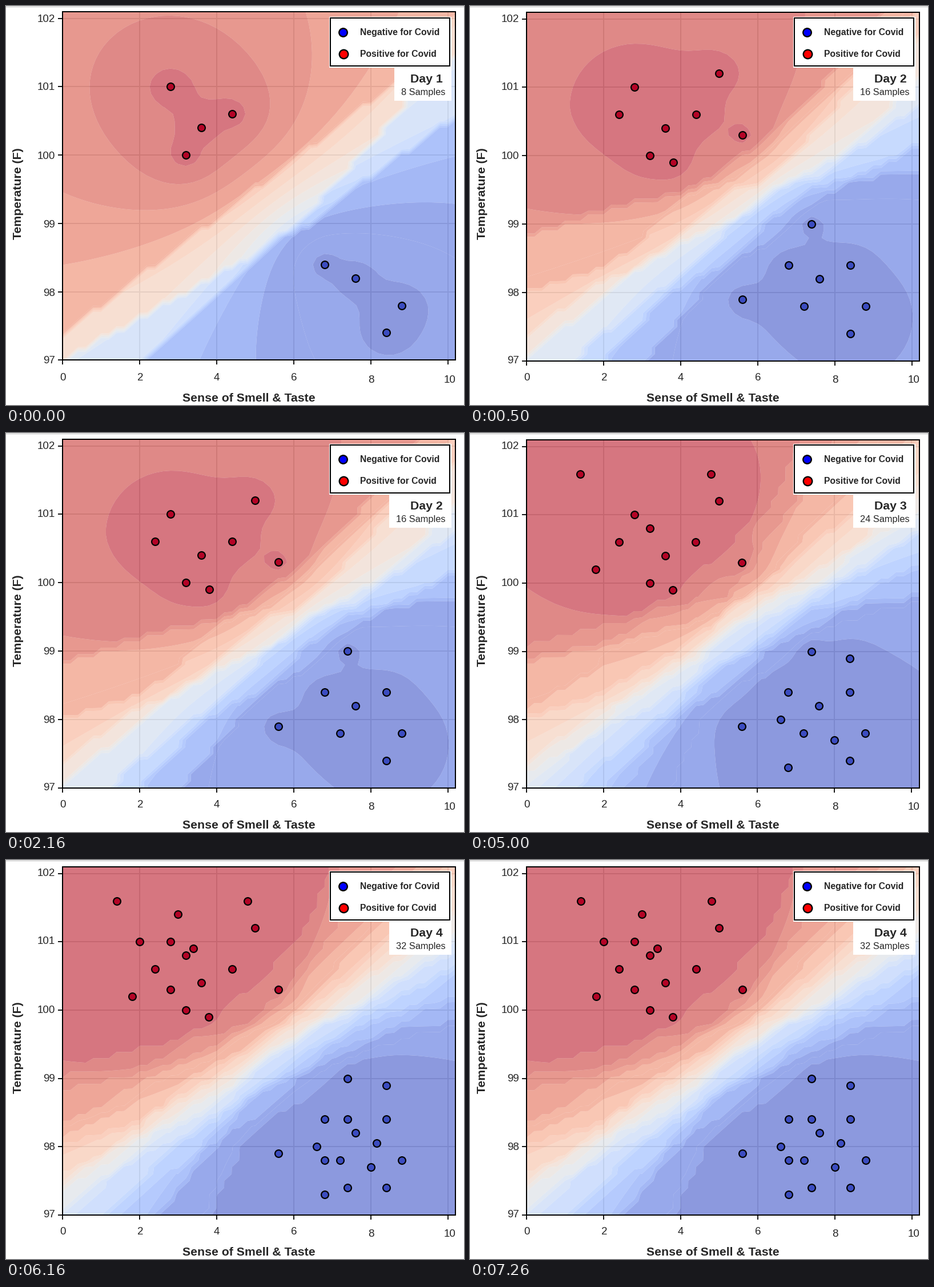
Write a matplotlib script that moves like this. It is 802x699 px and loops after 8000 ms.

```python
import numpy as np
import matplotlib.pyplot as plt
from matplotlib.animation import FuncAnimation
from matplotlib.patches import Rectangle

W, H, DPI = 802, 699, 100
PT = 72 / DPI                       # points per pixel
INTERVAL, FRAMES = 20, 400
STARTS = (0, 500, 3260, 6160)       # ms at which each day appears
X_MAX, Y_MIN, Y_MAX = 10.2, 97, 102.1
INK = "#262626"

# Samples added each day: (smell & taste, temperature)
POSITIVE = [
    [(2.8, 101), (4.4, 100.6), (3.6, 100.4), (3.2, 100)],
    [(5, 101.2), (2.4, 100.6), (5.6, 100.3), (3.8, 99.9)],
    [(1.4, 101.6), (4.8, 101.6), (3.2, 100.8), (1.8, 100.2)],
    [(3, 101.4), (2, 101), (3.4, 100.9), (2.8, 100.3)],
]
NEGATIVE = [
    [(6.8, 98.4), (7.6, 98.2), (8.8, 97.8), (8.4, 97.4)],
    [(7.4, 99), (8.4, 98.4), (5.6, 97.9), (7.2, 97.8)],
    [(8.4, 98.9), (6.6, 98), (8, 97.7), (6.8, 97.3)],
    [(7.4, 98.4), (8.15, 98.05), (6.8, 97.8), (7.4, 97.4)],
]
# Plot box of each day in pixels: left, top, right, bottom
BOXES = [
    (99.0, 9.8, 787.0, 620.3),
    (99.3, 10.6, 787.0, 622.0),
    (98.8, 11.7, 786.6, 621.9),
    (99.2, 11.7, 787.0, 621.9),
]

GX, GY = np.meshgrid(np.linspace(0, X_MAX, 52), np.linspace(Y_MIN, Y_MAX, 52))
LEVELS = np.linspace(0, 1, 25)


def band_colors():
    colors = plt.cm.coolwarm((LEVELS[:-1] + LEVELS[1:]) / 2)[:, :3]
    for a, b in ((1, 2), (18, 19)):  # neighbouring bands that share a shade
        colors[a] = colors[b] = (colors[a] + colors[b]) / 2
    return list(colors)


def probability(pos, neg):
    """Distance-weighted nearest-neighbour chance of a positive result."""
    pts = np.array(pos + neg)
    k = len(pts) // 2 + 1
    dist = np.hypot(GX[..., None] - pts[:, 0],
                    2 * (GY[..., None] - pts[:, 1])).round(9)
    near = np.argsort(dist, axis=-1, kind="stable")[..., :k]
    weight = 1 / np.maximum(np.take_along_axis(dist, near, -1), 1e-9)
    return (weight * (near < len(pos))).sum(-1) / weight.sum(-1)


def add_dots(ax, pts, color, diameter, width):
    x, y = zip(*pts)
    ax.scatter(x, y, s=(diameter * PT) ** 2, color=color, edgecolor="black",
               linewidth=width * PT, zorder=3)


def add_day(day):
    left, top, right, bottom = BOXES[day]
    ax = fig.add_axes([left / W, 1 - bottom / H,
                       (right - left) / W, (bottom - top) / H])
    pos, neg = sum(POSITIVE[:day + 1], []), sum(NEGATIVE[:day + 1], [])
    ax.contourf(GX, GY, probability(pos, neg), levels=LEVELS,
                colors=COLORS, alpha=0.6, antialiased=True)
    add_dots(ax, pos, plt.cm.coolwarm(1.0), 12.8, 2.2)
    add_dots(ax, neg, plt.cm.coolwarm(0.0), 12.8, 2.2)
    ax.set(xlim=(0, X_MAX), ylim=(Y_MIN, Y_MAX),
           xticks=range(0, 11, 2), yticks=range(97, 103))
    ax.tick_params(length=8 * PT, width=1.8 * PT, labelbottom=False,
                   labelleft=False)
    ax.set_axisbelow(True)
    ax.grid(color="#d6d6d6", linewidth=2 * PT)
    for spine in ax.spines.values():
        spine.set_linewidth(2 * PT)
    ax.set_visible(False)
    return ax


def label(x, y, text, size, ha="left", weight="normal"):
    """Text whose capitals are centred on pixel row y."""
    return stage.text(x, y + 0.36 * size, text, fontsize=size * PT, ha=ha,
                      va="baseline", weight=weight, color=INK, zorder=4)


def box(x0, y0, x1, y1, edge="none"):
    patch = Rectangle((x0, y0), x1 - x0, y1 - y0, facecolor="white",
                      edgecolor=edge, linewidth=2 * PT, zorder=2)
    return stage.add_patch(patch)


plt.rcParams["font.family"] = "Liberation Sans"
fig = plt.figure(figsize=(8.02, 6.99), dpi=DPI, facecolor="white")
COLORS = band_colors()
days = [add_day(d) for d in range(4)]

# Overlay in pixel coordinates, y pointing down
stage = fig.add_axes([0, 0, 1, 1], zorder=2)
stage.set(xlim=(0, W), ylim=(H, 0))
stage.axis("off")

stage.plot([0, W - 0.5, W - 0.5], [0.5, 0.5, H], color="#b4b4b4",
           linewidth=PT, zorder=1)

for value, (x, y) in zip(range(0, 11, 2), [(99.5, 649), (235, 649), (369, 649),
                                           (504, 649), (639, 653), (777, 653)]):
    label(x, y, str(value), 18.8, "center")
for value, y in zip(range(102, 96, -1), (21, 140, 261.5, 381.5, 501.5, 619)):
    label(85.5, y, str(value), 18.8, "right")

label(425, 685, "Sense of Smell & Taste", 21.3, "center", "bold")
stage.text(26.6, 328.5, "Temperature (F)", fontsize=21.3 * PT, rotation=90,
           rotation_mode="anchor", ha="center", va="baseline",
           weight="bold", color=INK)

box(566, 19, 780, 108)
box(568, 21, 777, 105, "black")
add_dots(stage, [(590, 45.5)], "#0000ff", 14.5, 2.4)
add_dots(stage, [(590.5, 83.5)], "#ff0000", 15.5, 2.4)
label(620.5, 45.5, "Negative for Covid", 15.8, weight="bold")
label(620.5, 83, "Positive for Covid", 15.7, weight="bold")

day_box = box(671, 106, 780, 166)
day_text = label(764.5, 126, "", 21.3, "right", "bold")
count_text = label(769.5, 150.5, "", 16.4, "right")


def update(i):
    day = sum(i * INTERVAL >= t for t in STARTS) - 1
    for d, ax in enumerate(days):
        ax.set_visible(d == day)
    left = 680 if day == 0 else 671
    day_box.set_x(left)
    day_box.set_width(780 - left)
    day_text.set_text(f"Day {day + 1}")
    count_text.set_text(f"{8 * (day + 1)} Samples")
    return days + [day_box, day_text, count_text]


anim = FuncAnimation(fig, update, frames=FRAMES, interval=INTERVAL,
                     repeat=True, cache_frame_data=False)
plt.show()
```
